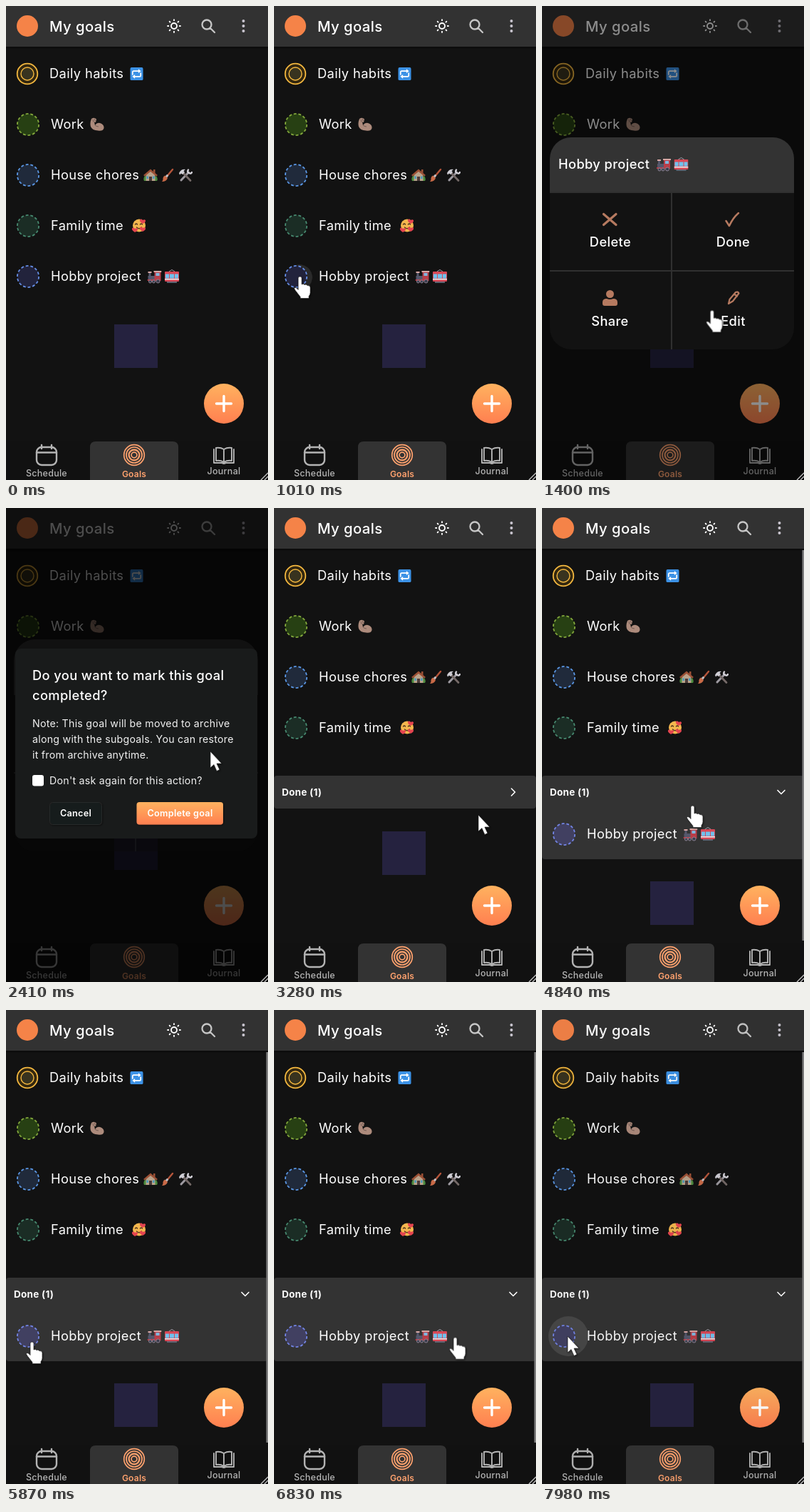
An HTML page that plays this animation: 368 by 664 pixels, repeating every 8 s.

```html
<!DOCTYPE html>
<html lang="en">
<head>
<meta charset="utf-8">
<title>My goals</title>
<style>
html, body { margin: 0; width: 100%; height: 100%; overflow: hidden; background: #121212; }
svg.stage { display: block; width: 368px; height: 664px; }
text { font: 400 18.3px Inter, "Noto Sans", sans-serif; letter-spacing: .02em; fill: #fff; }
.title { font-size: 20.3px; font-weight: 500; }
.medium { font-weight: 500; }
.small { font-size: 14.2px; letter-spacing: .018em; fill: #f2f2f2; }
.button { font-size: 12.7px; font-weight: 600; text-anchor: middle; }
.bar { font-size: 13.5px; font-weight: 700; }
.tab { font-size: 12.5px; font-weight: 500; text-anchor: middle; fill: #b4b4b4; }
.tab.on { font-size: 12px; font-weight: 600; fill: #ffa26e; }
.mid { text-anchor: middle; }
.line { fill: none; stroke-linecap: round; stroke-linejoin: round; }
.dash { stroke-width: 1.8; stroke-dasharray: 4 3; }

/* One 8 s loop shared by every part */
.anim { animation: 8s linear infinite; }
.cursor { animation-name: travel; }
.hand { animation-name: hand; animation-timing-function: step-end; }
.arrow { animation-name: arrow; animation-timing-function: step-end; }
.active { animation-name: active; animation-timing-function: step-end; }
.archived { animation-name: archived; animation-timing-function: step-end; }
.panel { animation-name: expand; }
.chevron { animation-name: turn; }
.mark { animation-name: push; }
.scroll { animation-name: scroll; animation-timing-function: step-end; }
.tap1 { animation-name: tap1; }
.tap2 { animation-name: tap2; }
.mask1 { animation-name: mask1; }
.mask2 { animation-name: mask2; }
.menu { animation-name: menu; transform-origin: 182px 332px; }
.confirm { animation-name: confirm; transform-origin: 182px 332px; }

@keyframes travel {
  0%, 1.125% { transform: translate(287px, 668px); animation-timing-function: cubic-bezier(.3, .1, .4, 1); }
  10.125%, 14% { transform: translate(36px, 380px); animation-timing-function: ease-in; }
  17.5% { transform: translate(238px, 428px); animation-timing-function: ease-out; }
  20.5%, 32% { transform: translate(287px, 342px); animation-timing-function: ease-in-out; }
  34.75%, 42.25% { transform: translate(287px, 431px); animation-timing-function: ease-in-out; }
  45.625% { transform: translate(308px, 472px); animation-timing-function: ease-in-out; }
  51.25%, 52.375% { transform: translate(226px, 402px); animation-timing-function: ease-in-out; }
  56.25%, 60.625% { transform: translate(211px, 418px); animation-timing-function: ease-in; }
  62.5% { transform: translate(82px, 398px); animation-timing-function: ease-out; }
  68.75%, 73.375% { transform: translate(36px, 466px); animation-timing-function: ease-in-out; }
  79.375%, 83% { transform: translate(300px, 460px); animation-timing-function: ease-in-out; }
  91.25%, 100% { transform: translate(36px, 458px); }
}
@keyframes hand {
  0%, 12.75%, 23%, 37%, 97.5%, 100% { opacity: 0; }
  8%, 15.6%, 34%, 49.5% { opacity: 1; }
}
@keyframes arrow {
  0%, 12.75%, 23%, 37%, 97.5%, 100% { opacity: 1; }
  8%, 15.6%, 34%, 49.5% { opacity: 0; }
}
@keyframes active { 0% { opacity: 1; } 37.5%, 100% { opacity: 0; } }
@keyframes archived { 0% { opacity: 0; } 37.5%, 100% { opacity: 1; } }
@keyframes scroll { 0% { opacity: 0; } 54.5%, 100% { opacity: 1; } }
@keyframes expand {
  0%, 53.75% { clip-path: inset(0 0 71px 0 round 4px); animation-timing-function: ease-in-out; }
  56.5%, 100% { clip-path: inset(0 0 0 0 round 4px); }
}
@keyframes turn {
  0%, 53.75% { transform: rotate(0deg); animation-timing-function: ease-in-out; }
  56.5%, 100% { transform: rotate(90deg); }
}
@keyframes push {
  0%, 37.49% { transform: translateY(0); }
  37.5%, 53.75% { transform: translateY(7px); animation-timing-function: ease-in-out; }
  56.5%, 100% { transform: translateY(77px); }
}
@keyframes tap1 {
  0%, 11.5% { transform: scale(0); opacity: 1; animation-timing-function: ease-out; }
  14% { transform: scale(1); opacity: 1; }
  15.6%, 100% { transform: scale(1); opacity: 0; }
}
@keyframes tap2 {
  0%, 94.5% { transform: scale(0); animation-timing-function: ease-out; }
  97%, 100% { transform: scale(1); }
}
@keyframes mask1 {
  0%, 13.125% { opacity: 0; }
  15.625%, 30.25% { opacity: .45; }
  32%, 99.375% { opacity: 0; }
  100% { opacity: .06; }
}
@keyframes mask2 {
  0%, 27.5% { opacity: 0; }
  30%, 36.875% { opacity: .45; }
  39.375%, 100% { opacity: 0; }
}
@keyframes menu {
  0%, 13.125% { opacity: 0; transform: scale(.8); animation-timing-function: ease-out; }
  15.625%, 29% { opacity: 1; transform: none; }
  31.5%, 100% { opacity: 0; transform: none; }
}
@keyframes confirm {
  0%, 27.5% { opacity: 0; transform: scale(.8); animation-timing-function: ease-out; }
  30%, 36.875% { opacity: 1; transform: none; animation-timing-function: ease-in; }
  39%, 100% { opacity: 0; transform: scale(.9); }
}
</style>
</head>
<body>
<svg class="stage" viewBox="0 0 368 664" xmlns="http://www.w3.org/2000/svg">
  <defs>
    <linearGradient id="warm" x2="0" y2="1">
      <stop stop-color="#ffb25f"/><stop offset="1" stop-color="#ff7f50"/>
    </linearGradient>
    <linearGradient id="shade" x2="0" y2="1">
      <stop stop-color="#000" stop-opacity=".45"/><stop offset="1" stop-color="#000" stop-opacity="0"/>
    </linearGradient>
    <filter id="drop" x="-50%" y="-50%" width="200%" height="200%">
      <feDropShadow dx="1" dy="1" stdDeviation="1" flood-opacity=".5"/>
    </filter>
    <clipPath id="sheet"><rect x="11" y="184" width="343" height="297" rx="30"/></clipPath>

    <symbol id="repeat" viewBox="0 0 20 20">
      <rect x=".5" y=".5" width="19" height="19" rx="2" fill="#3c92e6"/>
      <path class="line" stroke="#fff" stroke-width="1.8" d="M4 11V7.5Q4 6 5.500 6H14M16 9v3.500Q16 14 14.500 14H6"/>
      <path fill="#fff" d="M12.500 3l4 3-4 3zM7.500 11l-4 3 4 3z"/>
    </symbol>
    <symbol id="arm" viewBox="0 0 20 20">
      <path fill="#ad8b7c" d="M2 2Q6-.5 9 2.500L8 7 6 6.500 7 11Q10 6.500 14 8 20 10 19.500 15 18 20 11 18.500 3 18 1 13-.5 8 2 2z"/>
      <path class="line" stroke="#715a52" d="M7 11q2 2 4.500 2M4 3l1 3.500M6.500 2l.5 3"/>
    </symbol>
    <symbol id="house" viewBox="0 0 20 20">
      <path fill="#4c8b3e" d="M1 18q-2-5 2-8l3 8zM16 18q-1-6 2-7 3 4 1 7z"/>
      <path fill="#b9a38b" d="M3.500 9L10 4l6.500 5v9h-13z"/>
      <path fill="#9c5136" d="M10 1.500L0 10l2 1.500 8-6.500 8 6.500 2-1.500zM14 2h2.500v5L14 5z"/>
      <path fill="#4c3b39" d="M8 12h4v6H8z"/><path fill="#4d9bbd" d="M13 11.500h2.500V15H13zM4.500 11.500H7V15H4.500z"/>
    </symbol>
    <symbol id="brush" viewBox="0 0 20 20">
      <path class="line" stroke="#b4553b" stroke-width="2.500" d="M17 2L9.500 11"/>
      <path class="line" stroke="#c2bdc0" stroke-width="3" d="M9.500 10.500l-1.500 2"/>
      <path fill="#c96a47" d="M6 10.500l4 3.500q-1.500 5-8 5 2-2 1.500-5 .5-2.500 2.500-3.500z"/>
    </symbol>
    <symbol id="tools" viewBox="0 0 20 20">
      <path class="line" stroke="#9e9aa1" stroke-width="3" d="M4 17L14.500 6"/>
      <path class="line" stroke="#d3d1d8" stroke-width="2.400" d="M14 2.500q-2 3 1 4.500t4-1"/>
      <path class="line" stroke="#756a68" stroke-width="2.800" d="M7 7l10 10.500"/>
      <path fill="#cfced5" d="M1 7Q4 1 10 2L7.500 4 9 6 6 9 4 7.500 2 9.500z"/>
    </symbol>
    <symbol id="love" viewBox="0 0 20 20">
      <circle cx="10" cy="9.500" r="9" fill="#f4b74e"/>
      <path class="line" stroke="#54371f" stroke-width="1.400" d="M4.500 8q1.500-2 3 0M11.500 8q1.500-2 3 0M6.500 12q3.500 3.500 7 0"/>
      <path id="heart" fill="#e4444f" d="M4 19Q-1 16 0 13.500q2-2 4 .5 3-1.500 4 .5.500 2-4 4.500z"/>
      <use href="#heart" x="11" y="-1"/><use href="#heart" x="11" y="-12"/>
    </symbol>
    <symbol id="engine" viewBox="0 0 20 20">
      <path fill="#55576c" d="M1 9h11v6H1zM2 4h3v6H2z"/>
      <path fill="#b93d48" d="M10 3h9v12h-9zM0 14h19v2H0z"/>
      <path fill="#80b8df" d="M12 5h5v4h-5z"/><path fill="#d8a8a5" d="M1 3h5v2H1zM9 2h11v2H9z"/>
      <g fill="#39394b" stroke="#8d8595"><circle cx="4" cy="17" r="2"/><circle cx="9" cy="17" r="2"/><circle cx="15" cy="16.500" r="2.500"/></g>
    </symbol>
    <symbol id="tram" viewBox="0 0 20 20">
      <path class="line" stroke="#a2a2af" d="M6 3l4-2.500L14 3"/>
      <rect y="3" width="20" height="14" rx="1" fill="#d94856"/>
      <path fill="#70c1ed" d="M1 6.500h5v6H1zM7 6.500h6v6H7zM14 6.500h5v6h-5z"/>
      <path fill="#eee" d="M0 13h20v1.500H0z"/><path fill="#5d6170" d="M3 17h14v2H3z"/>
    </symbol>
    <g id="trains">
      <use href="#engine" width="20" height="20"/><use href="#tram" x="24.500" width="20" height="20"/>
    </g>
    <circle id="ring" class="dash" r="15.100" pathLength="98"/>
    <path id="ray" d="M0-7.700v-1.200"/>
    <g id="rays"><use href="#ray"/><use href="#ray" transform="rotate(90)"/><use href="#ray" transform="rotate(180)"/><use href="#ray" transform="rotate(270)"/></g>
  </defs>

  <rect width="368" height="664" fill="#121212"/>

  <!-- Header -->
  <rect width="368" height="57" fill="#323232"/>
  <rect y="57" width="368" height="4" fill="url(#shade)"/>
  <circle cx="30" cy="28" r="15" fill="#f58348"/>
  <text class="title" x="61" y="36">My goals</text>
  <g class="line" stroke="#fff" stroke-width="1.900" transform="translate(236 28)">
    <circle r="4"/>
    <use href="#rays"/><use href="#rays" transform="rotate(45)"/>
  </g>
  <path class="line" stroke="#c6c6c6" stroke-width="2.300" d="M287 31l6 6M288.500 26a6.500 6.500 0 1 1-13 0a6.500 6.500 0 1 1 13 0z"/>
  <g fill="#c9c5cf"><circle cx="333.500" cy="21" r="2"/><circle cx="333.500" cy="28" r="2"/><circle cx="333.500" cy="35" r="2"/></g>

  <!-- Plain shape in place of the wordmark -->
  <rect class="anim mark" x="152" y="446" width="61" height="61" fill="#25223f"/>

  <!-- Goals -->
  <g stroke="#f3b73f" stroke-width="1.800" fill="#33270f">
    <circle cx="30" cy="95" r="14.300"/><circle cx="30" cy="95" r="9" stroke-width="1.400" fill="#38331f"/>
  </g>
  <text x="61" y="101">Daily habits</text>
  <use href="#repeat" x="174" y="85" width="19" height="20"/>

  <use href="#ring" x="31" y="166" fill="#274013" stroke="#83a83c"/>
  <text x="63" y="172">Work</text>
  <use href="#arm" x="118" y="156" width="20" height="20"/>

  <use href="#ring" x="31" y="237" fill="#202a3b" stroke="#5b98e6"/>
  <text x="63" y="243">House chores</text>
  <use href="#house" x="193" y="227" width="20" height="20"/>
  <use href="#brush" x="217" y="227" width="20" height="20"/>
  <use href="#tools" x="242" y="227" width="20" height="20"/>

  <use href="#ring" x="31" y="308" fill="#1b2d25" stroke="#478a70"/>
  <text x="63" y="314">Family time</text>
  <use href="#love" x="177" y="298" width="20" height="20"/>

  <g class="anim active">
    <g transform="translate(36 380)"><circle class="anim tap1" r="28" fill="#fff" fill-opacity=".1"/></g>
    <use href="#ring" x="31" y="379" fill="#22233c" stroke="#658ee6"/>
    <text x="63" y="385">Hobby project</text>
    <use href="#trains" x="198.500" y="369"/>
  </g>

  <!-- Finished goals -->
  <g class="anim archived">
    <g class="anim panel">
      <rect y="375" width="368" height="117" fill="#333"/>
      <g transform="translate(37 457)"><circle class="anim tap2" r="28" fill="#fff" fill-opacity=".1"/></g>
      <use href="#ring" x="31" y="457" fill="#414061" stroke="#7385e6"/>
      <text x="63" y="463">Hobby project</text>
      <use href="#trains" x="198.500" y="447"/>
    </g>
    <text class="bar" x="11" y="403">Done (1)</text>
    <g transform="translate(336 398)">
      <path class="anim chevron line" stroke="#fff" stroke-width="1.600" d="M-2.500-5L2.500 0-2.500 5"/>
    </g>
  </g>
  <g class="anim scroll">
    <rect x="365.500" y="59" width="2.500" height="547" fill="#7d7d7d"/>
  </g>

  <circle cx="306" cy="557" r="28" fill="url(#warm)"/>
  <path class="line" stroke="#fff" stroke-width="3.400" d="M295.500 557h21M306 546.500v21"/>

  <!-- Bottom tabs -->
  <rect y="610" width="368" height="54" fill="#111"/>
  <path fill="#333" d="M118 664v-46q0-8 8-8h108q8 0 8 8v46z"/>
  <g class="line" stroke="#b4b4b4" stroke-width="2.400">
    <rect x="43" y="618" width="28" height="25" rx="7"/>
    <path d="M43 625.500h28M50 615v5M64 615v5"/>
  </g>
  <text class="tab" x="57" y="659">Schedule</text>
  <g fill="none" stroke="#ffa26e" stroke-width="1.700">
    <circle cx="180" cy="629" r="14.300"/><circle cx="180" cy="629" r="11"/>
    <circle cx="180" cy="629" r="7.400" stroke-width="2.200"/><circle cx="180" cy="629" r="3.900"/>
  </g>
  <text class="tab on" x="180" y="660">Goals</text>
  <path class="line" stroke="#b4b4b4" stroke-width="1.900" d="M306 621q-5-3-11-2v18q6-1 11 2 5-3 11-2v-18q-6-1-11 2zv18M292 621v19h11l3 1 3-1h11v-19"/>
  <text class="tab" x="306" y="656">Journal</text>

  <rect class="anim mask1" width="368" height="664"/>

  <!-- Goal menu -->
  <g class="anim menu">
    <g clip-path="url(#sheet)">
      <rect x="11" y="184" width="343" height="297" fill="#121212"/>
      <rect x="11" y="184" width="343" height="77" fill="#333"/>
      <path stroke="#303030" stroke-width="2" d="M11 261h343M11 371h343M182 261v220"/>
    </g>
    <text class="medium" x="23" y="228">Hobby project</text>
    <use href="#trains" x="161" y="212"/>
    <g class="line" stroke="#b67a60" stroke-width="3.200">
      <path d="M86.500 291.500l17.500 15M104 291.500l-17.500 15"/>
      <path stroke-width="2.500" d="M258.500 301l4.500 7q5-11 13-18"/>
      <path stroke-width="2.200" d="M262 417l1.500-6 8.500-10q3-1.500 4.500 1.500l-8.500 11zM270 403.500l4 3"/>
    </g>
    <g fill="#b67a60"><circle cx="95.500" cy="403.500" r="5.500"/><path d="M85 415q0-5 6-5 4 2 9 0 6 0 6 5v2q0 3-3 3H88q-3 0-3-3z"/></g>
    <g class="mid">
      <text class="medium" x="96" y="337">Delete</text>
      <text class="medium" x="268.500" y="337">Done</text>
      <text class="medium" x="95.500" y="448">Share</text>
      <text class="medium" x="268.500" y="448">Edit</text>
    </g>
  </g>

  <rect class="anim mask2" width="368" height="664"/>

  <!-- Confirmation -->
  <g class="anim confirm">
    <rect x="13" y="197" width="340" height="266" rx="8" fill="#191b1b"/>
    <text class="medium" x="37" y="241">Do you want to mark this goal</text>
    <text class="medium" x="37" y="269">completed?</text>
    <text class="small" x="37" y="307">Note: This goal will be moved to archive</text>
    <text class="small" x="37" y="329">along with the subgoals. You can restore</text>
    <text class="small" x="37" y="351">it from archive anytime.</text>
    <rect x="37" y="374" width="16" height="15.500" rx="3" fill="#fff"/>
    <text class="small" x="61" y="387">Don't ask again for this action?</text>
    <rect x="61.500" y="412.500" width="73" height="31" rx="4" fill="#191b1b" stroke="#272929" filter="url(#drop)"/>
    <text class="button" x="98" y="432">Cancel</text>
    <rect x="183.500" y="412" width="121.500" height="31.500" rx="4" fill="url(#warm)" filter="url(#drop)"/>
    <text class="button" x="244.500" y="432">Complete goal</text>
  </g>

  <path stroke="#c9c9c9" stroke-width="1.300" d="M358 664l10-10M363 664l5-5"/>

  <g class="anim cursor">
    <g filter="url(#drop)" fill="#fff" stroke="#222" stroke-width=".7" stroke-linejoin="round">
      <path class="anim arrow" d="M0-1v23l5-4.500 4 9 4-2-4-8.500h7z"/>
      <path class="anim hand" d="M-2 1Q-2-1 .5-1T3 1v9q2-1.500 4 .5 2-1.500 4 1 4-.5 4 3v7q0 3-2 5v3H1v-2l-7-9q-3-4 0-4 2 0 4 3z"/>
    </g>
  </g>
</svg>
</body>
</html>
```
